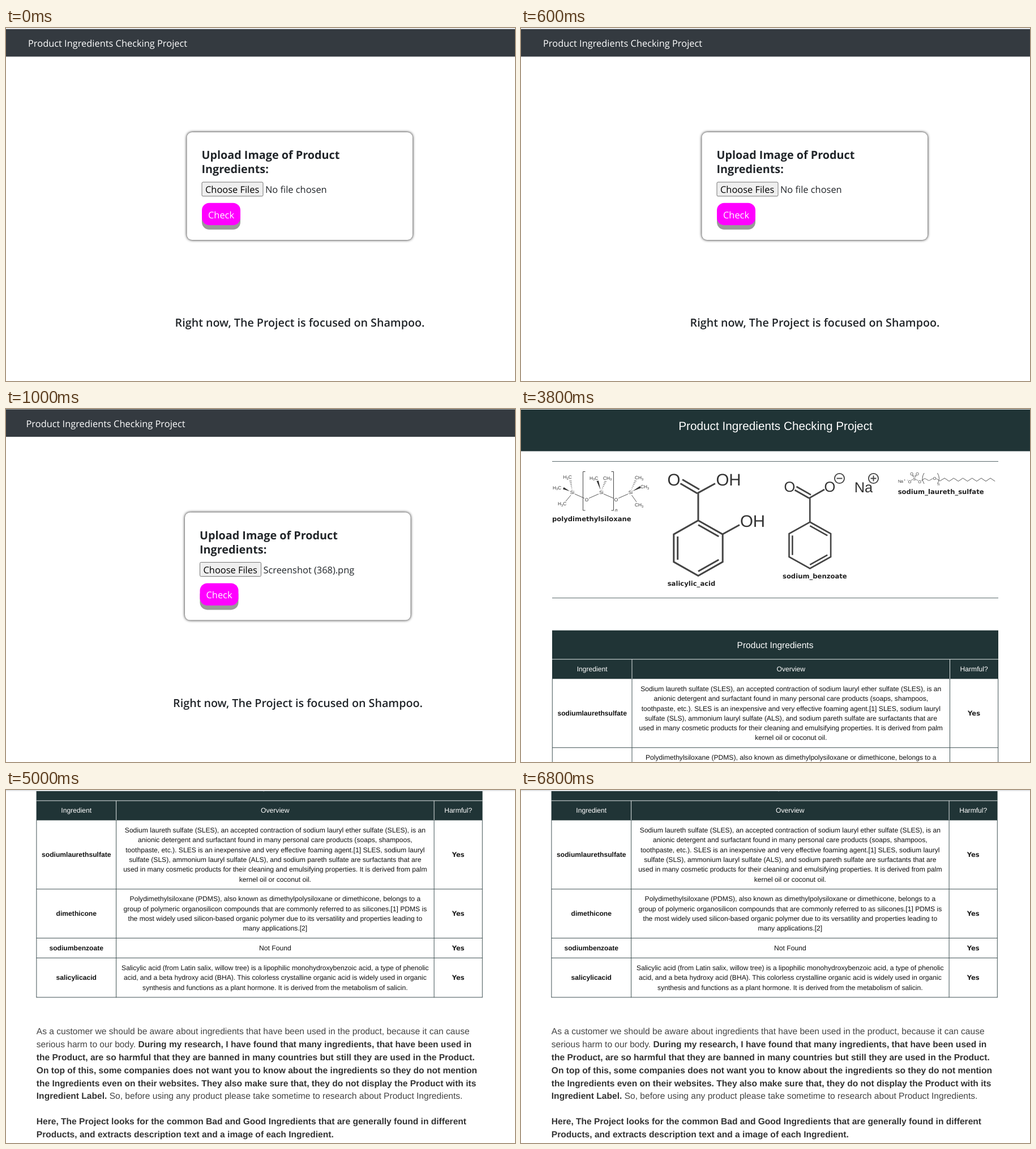
These frames come from a looping animation (899 by 623 pixels, 8000 ms). An HTML page:

```html
<!DOCTYPE html>
<html lang="en">
<head>
<meta charset="utf-8">
<title>Product Ingredients Checking Project</title>
<style>
html, body { margin: 0; width: 100%; height: 100%; overflow: hidden; background: #fff; }
svg { display: block; width: 899px; height: 623px; text-rendering: geometricPrecision; }
.ui { font: 16.4px "Open Sans", "Noto Sans", sans-serif; fill: #212529; }
.page { font: 12.11px "Liberation Sans", Arial, sans-serif; fill: #111; }
.black { font: bold 11.6px "DejaVu Sans", sans-serif; fill: #222; }
.bold { font-weight: bold; }
.mid { text-anchor: middle; }
.white { fill: #fff; }
.body { font-size: 15.57px; fill: #444; }
.body .bold { fill: #333; }
.bond { fill: none; stroke: #444; }
.atom { fill: #333; }
</style>
</head>
<body>
<svg viewBox="0 0 899 623">
  <g id="upload" class="ui">
    <rect x="-10" width="920" height="3" fill="#e6e9ed"/>
    <rect x="-10" y="2" width="920" height="48.5" fill="#343a40"/>
    <text x="39" y="33" class="white">Product Ingredients Checking Project</text>
    <rect x="319.5" y="184" width="398.5" height="190" rx="9" fill="#000" style="filter:blur(2.7px)"/>
    <rect x="319.5" y="184" width="398.5" height="190" rx="9" fill="#fff"/>
    <g class="bold" font-size="19.8">
      <text x="345.5" y="231">Upload Image of Product</text>
      <text x="345.5" y="256">Ingredients:</text>
    </g>
    <rect x="346" y="272" width="108" height="24.8" rx="2" fill="#efefef" stroke="#767676"/>
    <text x="352" y="291" fill="#000">Choose Files</text>
    <text id="file" x="458" y="291">No file chosen</text>
    <rect x="346" y="316.5" width="68" height="39.3" rx="13" fill="#999"/>
    <rect x="346" y="308.8" width="68" height="39.3" rx="13" fill="#f0f"/>
    <text x="380" y="335.5" class="white mid">Check</text>
    <text x="519" y="527" class="mid" font-weight="600" font-size="19.7">Right now, The Project is focused on Shampoo.</text>
  </g>

  <g id="result" class="page">
    <g id="top">
      <rect width="899" height="2" fill="#dfe3e5"/>
      <rect y="1" width="899" height="73.5" fill="#203436"/>
      <text x="449.5" y="37.2" class="white mid" font-size="20.76">Product Ingredients Checking Project</text>
      <path d="M55 92.5H843M55 333.5H843" stroke="#5a6a6c"/>
      <g id="drawings"></g>
    </g>
    <g id="table"></g>
    <g id="notes" class="body">
      <rect width="899" height="2" fill="#e4e6e8"/>
    </g>
  </g>
</svg>
<script>
const NS = "http://www.w3.org/2000/svg";
const $ = id => document.getElementById(id);

function add(parent, tag, attrs, text) {
  const el = document.createElementNS(NS, tag);
  for (const k in attrs) el.setAttribute(k, attrs[k]);
  if (text) el.textContent = text;
  parent.appendChild(el);
  return el;
}
const label = (parent, x, y, text, cls, size) =>
  add(parent, "text", { x, y, class: cls, ...(size && { "font-size": size }) }, text);

// --- ingredient table ---
const table = $("table");
const DARK = "#203436", LINE = 17.3;
const COLS = [55.3, 196, 757.5, 842.7];
const center = i => (COLS[i] + COLS[i + 1]) / 2;

const rows = [
  [597.7, "sodiumlaurethsulfate", [
    "Sodium laureth sulfate (SLES), an accepted contraction of sodium lauryl ether sulfate (SLES), is an",
    "anionic detergent and surfactant found in many personal care products (soaps, shampoos,",
    "toothpaste, etc.). SLES is an inexpensive and very effective foaming agent.[1] SLES, sodium lauryl",
    "sulfate (SLS), ammonium lauryl sulfate (ALS), and sodium pareth sulfate are surfactants that are",
    "used in many cosmetic products for their cleaning and emulsifying properties. It is derived from palm",
    "kernel oil or coconut oil."]],
  [684.2, "dimethicone", [
    "Polydimethylsiloxane (PDMS), also known as dimethylpolysiloxane or dimethicone, belongs to a",
    "group of polymeric organosilicon compounds that are commonly referred to as silicones.[1] PDMS is",
    "the most widely used silicon-based organic polymer due to its versatility and properties leading to",
    "many applications.[2]"]],
  [719.2, "sodiumbenzoate", ["Not Found"]],
  [788.7, "salicylicacid", [
    "Salicylic acid (from Latin salix, willow tree) is a lipophilic monohydroxybenzoic acid, a type of phenolic",
    "acid, and a beta hydroxy acid (BHA). This colorless crystalline organic acid is widely used in organic",
    "synthesis and functions as a plant hormone. It is derived from the metabolism of salicin."]]
];

add(table, "rect", { x: 55, y: 390.7, width: 788, height: 85.6, fill: DARK });
add(table, "path", { d: "M55 441.7H843M196 441.7V476M757.5 441.7V476", stroke: "#dfe5e5" });
label(table, 449, 421.7, "Product Ingredients", "white mid", 15.57);
["Ingredient", "Overview", "Harmful?"].forEach((t, i) => label(table, center(i), 463, t, "white mid"));

let top0 = 476;
for (const [bottom, name, lines] of rows) {
  const base = (top0 + bottom) / 2 + 4.3;
  label(table, center(0), base, name, "bold mid");
  lines.forEach((t, i) =>
    label(table, center(1), base + (i - (lines.length - 1) / 2) * LINE, t, "mid"));
  label(table, center(2), base, "Yes", "black mid");
  add(table, "path", { d: `M55 ${bottom}H843`, stroke: "#405254" });
  top0 = bottom;
}
add(table, "path", { d: COLS.map(x => `M${x} 476V789`).join(""), stroke: "#405254" });

// --- closing notes: * marks a switch between plain and bold ---
const notes = [
  [431, "As a customer we should be aware about ingredients that have been used in the product, because it can cause"],
  [453.9, "serious harm to our body. *During my research, I have found that many ingredients, that have been used in"],
  [476.8, "*the Product, are so harmful that they are banned in many countries but still they are used in the Product."],
  [499.7, "*On top of this, some companies does not want you to know about the ingredients so they do not mention"],
  [522.5, "*the Ingredients even on their websites. They also make sure that, they do not display the Product with its"],
  [545.4, "*Ingredient Label.* So, before using any product please take sometime to research about Product Ingredients."],
  [589.7, "*Here, The Project looks for the common Bad and Good Ingredients that are generally found in different"],
  [612.5, "*Products, and extracts description text and a image of each Ingredient."]
];
for (const [y, line] of notes) {
  const el = label($("notes"), 53.8, y, "", "");
  line.split("*").forEach((t, i) => t && add(el, "tspan", { class: i % 2 ? "bold" : "" }, t));
}

// --- molecules ---
const art = $("drawings");
const bond = (d, w) => add(art, "path", { d, class: "bond", "stroke-width": w });
const wedge = d => add(art, "path", { d: d + "Z", class: "atom" });
const atom = (x, y, t, size) => label(art, x, y, t, "atom mid", size);

function methyl(x, y, flip) {
  const el = label(art, x, y, "", "atom", 8.3);
  const parts = flip ? ["CH", "3", ""] : ["H", "3", "C"];
  add(el, "tspan", {}, parts[0]);
  add(el, "tspan", { dy: 1.6, "font-size": 5.6 }, parts[1]);
  if (parts[2]) add(el, "tspan", { dy: -1.6 }, parts[2]);
}
// short bars that widen from one end to the other
function hash(x1, y1, x2, y2) {
  let d = "";
  for (let i = 0; i < 6; i++) {
    const t = i / 5, w = 0.5 + 1.6 * t, x = x1 + (x2 - x1) * t, y = y1 + (y2 - y1) * t;
    d += `M${x - w} ${y}H${x + w}`;
  }
  bond(d, 0.8);
}
// benzene ring with three inner bonds
function ring(cx, cy, rx, ry, k, w) {
  const at = (i, s) => {
    const a = i * Math.PI / 3;
    return `${cx + rx * s * Math.sin(a) / 0.866} ${cy - ry * s * Math.cos(a)}`;
  };
  bond("M" + [0, 1, 2, 3, 4, 5].map(i => at(i, 1)).join("L") + "Z", w);
  for (const i of [0, 2, 4]) bond(`M${at(i, k)}L${at(i + 1, k)}`, w);
}
function charge(x, y, plus) {
  add(art, "circle", { cx: x, cy: y, r: 8.6, class: "bond", "stroke-width": 1.8 });
  bond(`M${x - 5} ${y}h10` + (plus ? `M${x} ${y - 5}v10` : ""), 1.9);
}

// polydimethylsiloxane
methyl(74.5, 123); methyl(56, 141.5); methyl(65, 170);
methyl(121, 124.5); methyl(145, 124.5, true);
methyl(201, 124, true); methyl(211, 140, true); methyl(201, 172, true);
for (const x of [90.5, 142, 193.5]) atom(x, 150, "Si", 8.3);
for (const x of [116, 168]) atom(x, 163, "O", 8.3);
bond("M95 150L112 157.5M120 157.5L137 150M146 150L163.5 157.5M172 157.5L189 150", 0.9);
bond("M79 163L88 152M195.5 152L204 164", 0.9);
bond("M113.5 110.5H109.5V179H113.5M159.5 110.5H163.5V179H159.5", 1);
hash(90, 142, 87.5, 127); hash(143, 142, 149, 128); hash(195, 142, 202, 127);
wedge("M86 145L75.5 138L74 141.5"); wedge("M140.5 143L133.5 127L137 126.5"); wedge("M197 145L210 136L211.5 139.5");
add(art, "text", { x: 166, y: 181, class: "atom", "font-size": 8, "font-style": "italic" }, "n");

// salicylic acid
ring(313, 245.5, 43.2, 48.8, 0.84, 3);
bond("M313 197V148L343 131.5M311.5 149L281.5 131.5M315 142L285 124.5M356 221L386 204.5", 3);
atom(270, 134.5, "O", 29.5);
atom(366.5, 134.5, "OH", 29.5);
atom(409, 208, "OH", 29.5);

// sodium benzoate
ring(510.3, 240.5, 36.8, 41, 0.84, 2.6);
bond("M510.3 199.5V156.5L536 142M509 157.5L483.5 143M512 151.5L486.5 137", 2.6);
atom(474.5, 146, "O", 25.5);
atom(545.5, 145.5, "O", 25.5);
atom(605, 147, "Na", 25.5);
charge(562.5, 122.5, false);
charge(622.5, 122.5, true);

// sodium laureth sulfate
atom(670.5, 130, "Na", 7.2); atom(677.5, 127, "+", 5.5);
atom(683, 127, "-", 6); atom(686.5, 130.5, "O", 7.2);
atom(695, 125.5, "S", 7.2);
atom(690, 116.5, "O", 7.2); atom(700, 116.5, "O", 7.2);
atom(704, 130.5, "O", 7.2); atom(730.5, 124.5, "O", 7.2);
add(art, "text", { x: 736, y: 134.5, class: "atom", "font-size": 6.5 }, "n");
bond("M689 126L692.5 124M697.5 124L701 126.5M691 117L693 120M692.3 116.4L694.3 119.4M698.5 117L696.5 120M697.2 116.4L695.2 119.4", 0.8);
bond("M707 126.5L713 122.5L720.5 126.5L727.5 122.5M733.5 123L740 127", 0.8);
bond("M712 113Q706 122.5 712 132M735.5 113Q741.5 122.5 735.5 132", 0.9);
let zig = "M740 127";
for (let i = 1; i <= 12; i++) zig += `L${740 + i * 8.1} ${i % 2 ? 122 : 127.5}`;
bond(zig, 0.9);

label(art, 55, 198, "polydimethylsiloxane", "black");
label(art, 258.7, 311.5, "salicylic_acid", "black");
label(art, 462, 299, "sodium_benzoate", "black");
label(art, 665.7, 149.5, "sodium_laureth_sulfate", "black");

// --- timeline ---
const LOOP = 8000;
const steps = [
  { at: 0, page: "upload", shift: [0, 0], file: "No file chosen" },
  { at: 1000, page: "upload", shift: [-3.5, -1.4], file: "Screenshot (368).png" },
  { at: 2000, page: "result", shift: [0, 0], scrolled: false },
  { at: 5000, page: "result", shift: [-1.4, -422.8], scrolled: true }
];
const show = (id, on) => { $(id).style.display = on ? "" : "none"; };
const start = performance.now();
let current;

function apply(step) {
  const move = `translate(${step.shift})`;
  show("upload", step.page === "upload");
  show("result", step.page === "result");
  if (step.page === "upload") {
    $("upload").setAttribute("transform", move);
    $("file").textContent = step.file;
  } else {
    table.setAttribute("transform", move);
    show("top", !step.scrolled);
    show("notes", step.scrolled);
  }
}
function tick() {
  const t = Math.max(0, performance.now() - start) % LOOP;
  const step = steps.filter(s => s.at <= t).pop();
  if (step !== current) apply(current = step);
  requestAnimationFrame(tick);
}
tick();
</script>
</body>
</html>
```
